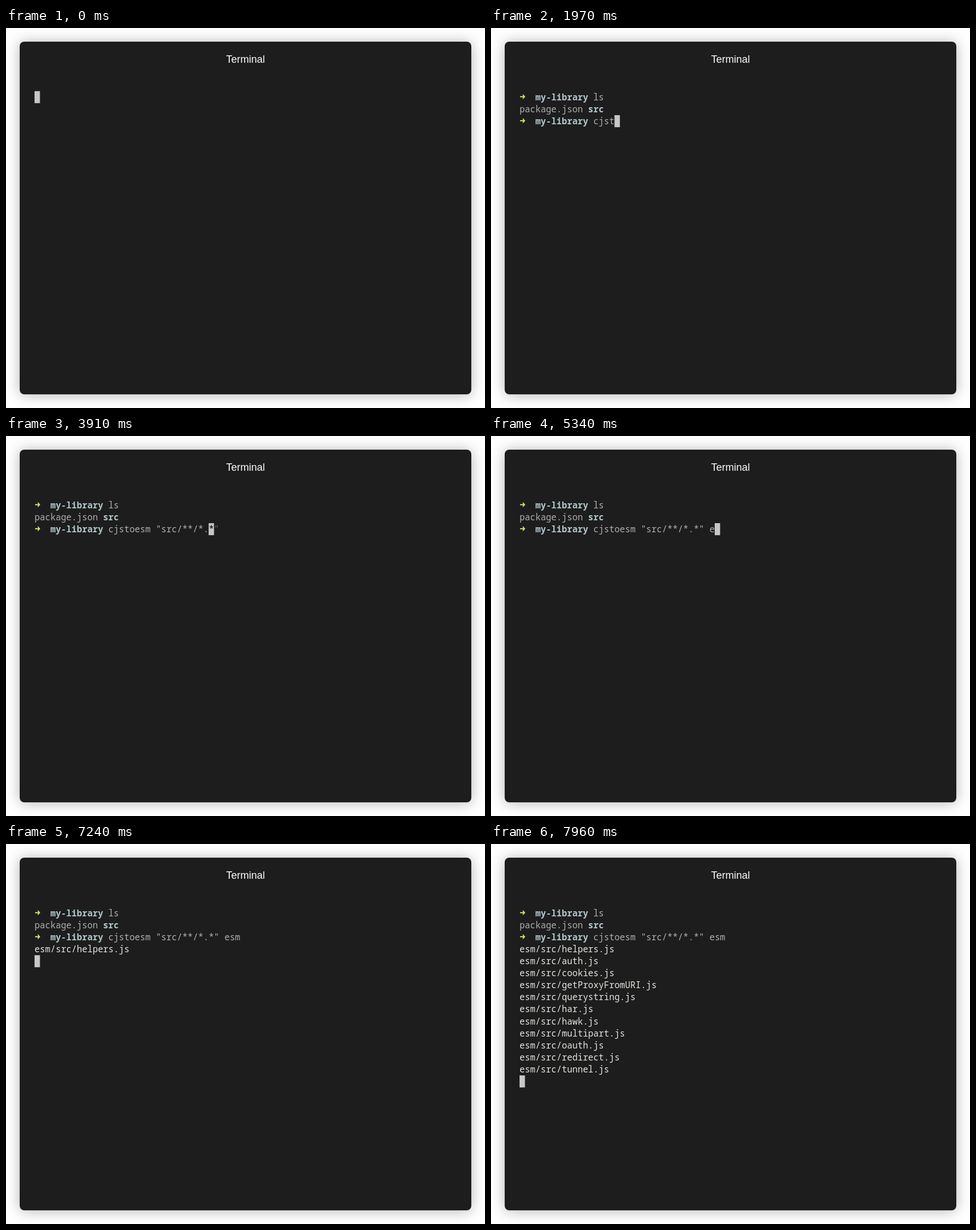
An HTML page with a canvas that plays this animation: 839x667 px, repeating every 8000 ms.

```html
<!DOCTYPE html>
<html lang="en">
<head>
<meta charset="utf-8">
<title>Terminal</title>
<style>
  html, body { margin: 0; width: 100%; height: 100%; overflow: hidden; background: #fff; }
  canvas { display: block; }
</style>
</head>
<body>
<canvas id="stage" width="839" height="667"></canvas>
<script>
const ctx = document.getElementById('stage').getContext('2d');

const LOOP = 8000;
const LEFT = 50, TOP = 110.8, COL = 9.24, ROW = 21.1;
const MONO = '15.4px "Noto Sans Mono", "DejaVu Sans Mono", monospace';
const COLORS = {
  back: '#1d1d1d', text: '#afafaf', cursor: '#c7c7c7', arrow: '#c8ed71',
  dir: '#b1c6ca', hint: '#626566', output: '#e4e4df'
};

const PROMPT_AT = 130, LIST_ENTER = 1000, LIST_DONE = 1080, RUN_ENTER = 5990;
const LIST = 'ls';
const LIST_KEYS = [830, 910];
const RUN = 'cjstoesm "src/**/*.*" esm';
const RUN_KEYS = [
  1620, 1700, 1790,
  1970, 2050, 2130, 2200, 2280, 2360, 2440,
  2630, 2680, 2860, 3130, 3300, 3470, 3560, 3660, 3910, 4300, 4690,
  5010, 5340, 5440, 5550
];
const HISTORY = ['cjstoesm "src/**/*.*"', 'cjstoesm "src/**/*.*" dist/js'];
const HINT_FROM = 10;

const FILES = ['helpers', 'auth', 'cookies', 'getProxyFromURI', 'querystring', 'har',
  'hawk', 'multipart', 'oauth', 'redirect', 'tunnel'];
const FILE_TIMES = [7240, 7260, 7360, 7460, 7560, 7660, 7760, 7760, 7860, 7860, 7960];

const reached = (times, t) => times.filter(at => at <= t).length;

function write(text, col, row, color, bold) {
  ctx.font = (bold ? 'bold ' : '') + MONO;
  ctx.fillStyle = color;
  [...text].forEach((ch, i) => ctx.fillText(ch, LEFT + (col + i) * COL, TOP + row * ROW + 15.8));
}

function cursor(col, row, under = '') {
  ctx.fillStyle = COLORS.cursor;
  ctx.fillRect(LEFT + col * COL, TOP + row * ROW, COL + 0.2, ROW);
  write(under, col, row, '#000');
}

function arrow(row) {
  const x = LEFT + 1, y = TOP + row * ROW + 9.8;
  ctx.strokeStyle = ctx.fillStyle = COLORS.arrow;
  ctx.lineWidth = 2;
  ctx.beginPath();
  ctx.moveTo(x, y);
  ctx.lineTo(x + 6, y);
  ctx.stroke();
  ctx.beginPath();
  ctx.moveTo(x + 4.2, y - 4);
  ctx.lineTo(x + 5.4, y - 4);
  ctx.lineTo(x + 9, y);
  ctx.lineTo(x + 5.4, y + 4);
  ctx.lineTo(x + 4.2, y + 4);
  ctx.lineTo(x + 5.8, y);
  ctx.fill();
}

function prompt(row, typed) {
  arrow(row);
  write('my-library', 3, row, COLORS.dir, true);
  write(typed, 14, row, COLORS.text);
}

function hintFor(typed) {
  if (typed.length < HINT_FROM || typed === HISTORY[0]) return '';
  const match = HISTORY.find(line => line.startsWith(typed));
  return match ? match.slice(typed.length) : '';
}

function drawWindow() {
  ctx.fillStyle = '#fff';
  ctx.fillRect(0, 0, 839, 667);
  ctx.save();
  ctx.shadowColor = 'rgba(0, 0, 0, 0.3)';
  ctx.shadowBlur = 25;
  ctx.shadowOffsetY = 1;
  ctx.fillStyle = COLORS.back;
  ctx.beginPath();
  ctx.roundRect(24, 24, 791, 619, 8);
  ctx.fill();
  ctx.restore();

  ctx.font = '18px "Liberation Sans", Arial, sans-serif';
  ctx.fillStyle = '#fff';
  ctx.textAlign = 'center';
  ctx.fillText('Terminal', 419.5, 60.5);
  ctx.textAlign = 'left';
}

function draw(t) {
  drawWindow();
  if (t < PROMPT_AT) return cursor(0, 0);

  const listed = LIST.slice(0, reached(LIST_KEYS, t));
  prompt(0, listed);
  if (t < LIST_ENTER) return cursor(14 + listed.length, 0);
  if (t < LIST_DONE) return cursor(0, 1);

  write('package.json', 0, 1, COLORS.text);
  write('src', 13, 1, COLORS.dir, true);

  const typed = RUN.slice(0, reached(RUN_KEYS, t));
  prompt(2, typed);
  if (t < RUN_ENTER) {
    const hint = hintFor(typed), col = 14 + typed.length;
    write(hint.slice(1), col + 1, 2, COLORS.hint);
    return cursor(col, 2, hint.slice(0, 1));
  }

  const count = reached(FILE_TIMES, t);
  FILES.slice(0, count).forEach((name, i) =>
    write(`esm/src/${name}.js`, 0, 3 + i, COLORS.output));
  cursor(0, 3 + count);
}

const start = performance.now();
function tick() {
  draw((performance.now() - start) % LOOP);
  requestAnimationFrame(tick);
}
tick();
</script>
</body>
</html>
```
